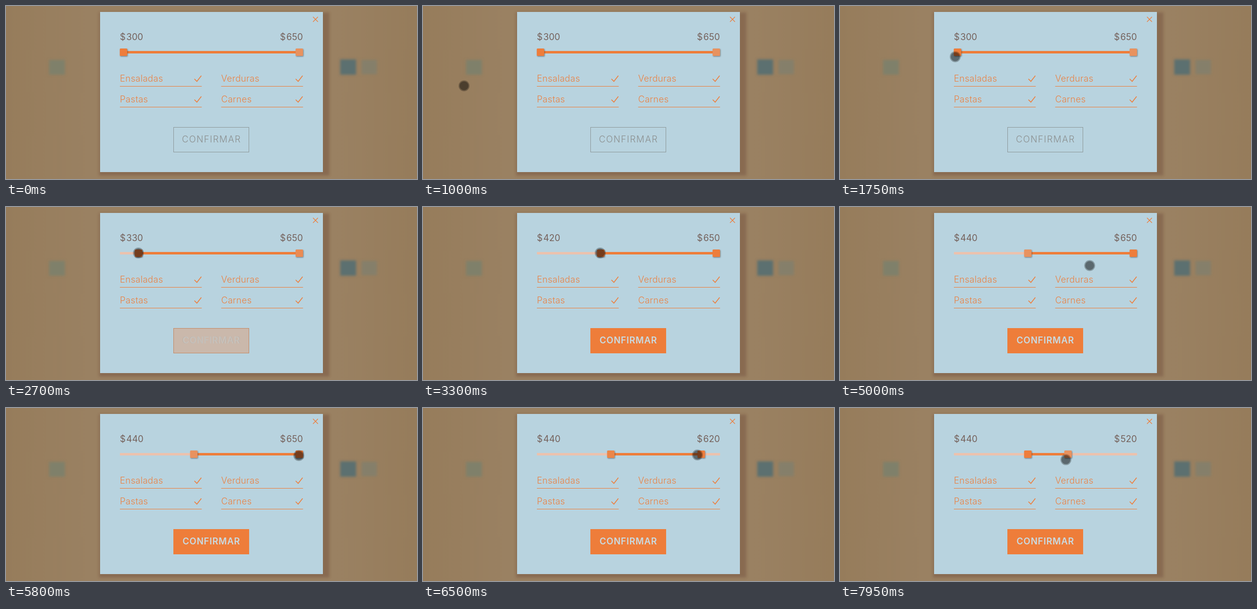
Recreate the animation shown at these times as an HTML page. Size 830 by 350 pixels, loop 8000 ms.

```html
<!DOCTYPE html>
<html lang="es">
<head>
<meta charset="utf-8">
<title>Filtro de precios</title>
<style>
  html, body { margin: 0; width: 100%; height: 100%; overflow: hidden; background: #998061; }
  svg { display: block; width: 830px; height: 350px; }
  text { font: 300 18px Inter, "Open Sans", sans-serif; }
  .price { font-weight: 400; fill: #74605a; }
  .item { fill: #ea8244; letter-spacing: .3px; }
  .line { fill: none; stroke: #ee7d3a; }
  .label { text-anchor: middle; }
</style>
</head>
<body>
<svg viewBox="0 0 830 350" xmlns="http://www.w3.org/2000/svg">
  <defs>
    <filter id="soft" x="-30%" y="-30%" width="160%" height="160%"><feGaussianBlur stdDeviation="2.5"/></filter>
    <filter id="drop" x="-50%" y="-50%" width="200%" height="200%">
      <feDropShadow dx="1" dy="1.2" stdDeviation="1" flood-color="#1c2a33" flood-opacity=".5"/>
    </filter>
    <linearGradient id="back">
      <stop offset="0" stop-color="#967c5b"/>
      <stop offset=".2" stop-color="#9a8162"/>
      <stop offset=".8" stop-color="#9a8162"/>
      <stop offset="1" stop-color="#967c5b"/>
    </linearGradient>
  </defs>

  <rect width="830" height="350" fill="url(#back)"/>
  <g filter="url(#soft)">
    <rect x="87" y="109" width="32" height="30" fill="#7f806b"/>
    <rect x="675" y="108" width="32" height="31" fill="#5c7070"/>
    <rect x="718" y="109" width="31" height="29" fill="#857f6b"/>
    <rect x="188" y="13" width="465" height="330" fill="#6b4434" opacity=".36"/>
  </g>

  <rect x="190" y="12" width="450" height="324" fill="#b8d3df"/>
  <path class="line" stroke-width="1.3" d="M620 22l10 10m0-10l-10 10"/>

  <text class="price" x="230" y="69">$<tspan id="low" dx="1.5"></tspan></text>
  <text class="price" x="599.5" y="69" text-anchor="end">$<tspan id="high" dx="1.5"></tspan></text>

  <rect x="230" y="91" width="370" height="5" rx="1" fill="#ebc2ae"/>
  <rect id="range" y="91" height="5" fill="#ee7d3a"/>
  <rect id="left" y="86" width="15" height="15" rx="1.5" filter="url(#drop)"/>
  <rect id="right" y="86" width="15" height="15" rx="1.5" filter="url(#drop)"/>

  <g id="items"></g>

  <rect id="button" x="338.5" y="245.5" width="152" height="50"/>
  <text id="thin" class="label" x="415" y="276" fill="#8b8f8f" letter-spacing="1.4">CONFIRMAR</text>
  <text id="bold" class="label" x="414.8" y="276" fill="#c9dbe2" letter-spacing=".8" style="font-weight:600">CONFIRMAR</text>

  <g id="cursor" fill="#000">
    <circle r="11" fill-opacity=".27"/>
    <circle r="9" fill-opacity=".32"/>
  </g>
</svg>
<script>
const LOOP = 8000, STEP = 10, PX = 1.0143;
const ORANGE = [238, 125, 58], PALE = [232, 146, 95], GREY = [141, 152, 154];
const $ = id => document.getElementById(id);
const set = (id, attrs) => { for (const k in attrs) $(id).setAttribute(k, attrs[k]); };

$('items').innerHTML = [
  ['Ensaladas', 230, 153], ['Verduras', 434.5, 153],
  ['Pastas', 230, 195], ['Carnes', 434.5, 195]
].map(([name, x, y]) => `
  <text class="item" x="${x}" y="${y}">${name}</text>
  <path class="line" d="M${x} ${y + 9.5}h165.3"/>
  <path class="line" stroke-width="1.6" d="M${x + 150.5} ${y - 5.5}l5 5 9-11.5"/>`).join('');

const lerp = (a, b, p) => a + (b - a) * p;
const ramp = (t, from, to) => Math.min(1, Math.max(0, (t - from) / (to - from)));
const mix = (a, b, p) => `rgb(${a.map((v, i) => Math.round(lerp(v, b[i], p)))})`;
const ease = p => p < .5 ? 2 * p * p : 1 - 2 * (1 - p) ** 2;
const valueToX = v => 237 + (v - 300) * PX;
const xToValue = x => 300 + (x - 237) / PX;

// One Hermite segment from (x0, y0) to (x1, y1) with slopes m0 and m1.
function hermite(x, x0, y0, m0, x1, y1, m1) {
  const h = x1 - x0, u = (x - x0) / h, v = 1 - u;
  return y0 * (1 + 2 * u) * v * v + h * m0 * u * v * v
       + y1 * u * u * (3 - 2 * u) - h * m1 * u * u * v;
}
const drag = p => p < .63 ? hermite(p, 0, 0, .8, .63, .85, 1)
                          : hermite(p, .63, .85, 1, 1, 1, 0);

const arc = (p, a, b, c) => [0, 1].map(i =>
  lerp(lerp(a[i], b[i], p), lerp(b[i], c[i], p), p));

function pointer(t) {
  if (t < 2400) return arc(ease(ramp(t, 450, 2000)), [-14, 150], [200, 190], [237, 93]);
  if (t < 4050) return [lerp(237, 379, drag(ramp(t, 2450, 3800))), 93];
  if (t < 6150) return arc(ease(ramp(t, 4050, 5950)), [379, 93], [522, 143], [593, 95]);
  if (t < 7650) return [lerp(593, 461, drag(ramp(t, 6200, 7450))), 95];
  const p = ramp(t, 7650, 8000) ** 2;
  return [lerp(461, 454.5, p), lerp(95, 108, p)];
}

function draw(t) {
  const [x, y] = pointer(t);
  set('cursor', { transform: `translate(${x.toFixed(2)} ${y.toFixed(2)})` });

  const low = t < 2450 ? 300 : t < 3800 ? Math.round(xToValue(x) / STEP) * STEP : 440;
  const high = t < 6200 ? 650 : t < 7450 ? Math.ceil(xToValue(x) / STEP - .05) * STEP : 520;
  $('low').textContent = low;
  $('high').textContent = high;

  const lx = valueToX(low), rx = valueToX(high) + .8;
  const leftPale = ramp(t, 4100, 4900) - ramp(t, 6000, 6900);
  const rightPale = 1 - ramp(t, 2450, 3200) + ramp(t, 7700, 7900);
  set('range', { x: lx, width: rx - lx });
  set('left', { x: lx - 7.2, fill: mix(ORANGE, PALE, leftPale) });
  set('right', { x: rx - 8, fill: mix(ORANGE, PALE, rightPale) });

  const p = ramp(t, 2450, 3250);
  set('button', {
    fill: mix(ORANGE, ORANGE, 0), 'fill-opacity': p,
    stroke: mix(GREY, ORANGE, Math.min(1, p * 1.8))
  });
  set('thin', { opacity: Math.max(0, 1 - p * 2.5) });
  set('bold', { opacity: p });
}

const start = performance.now();
function tick(now) {
  draw(Math.max(0, now - start) % LOOP);
  requestAnimationFrame(tick);
}
draw(0);
requestAnimationFrame(tick);
</script>
</body>
</html>
```
